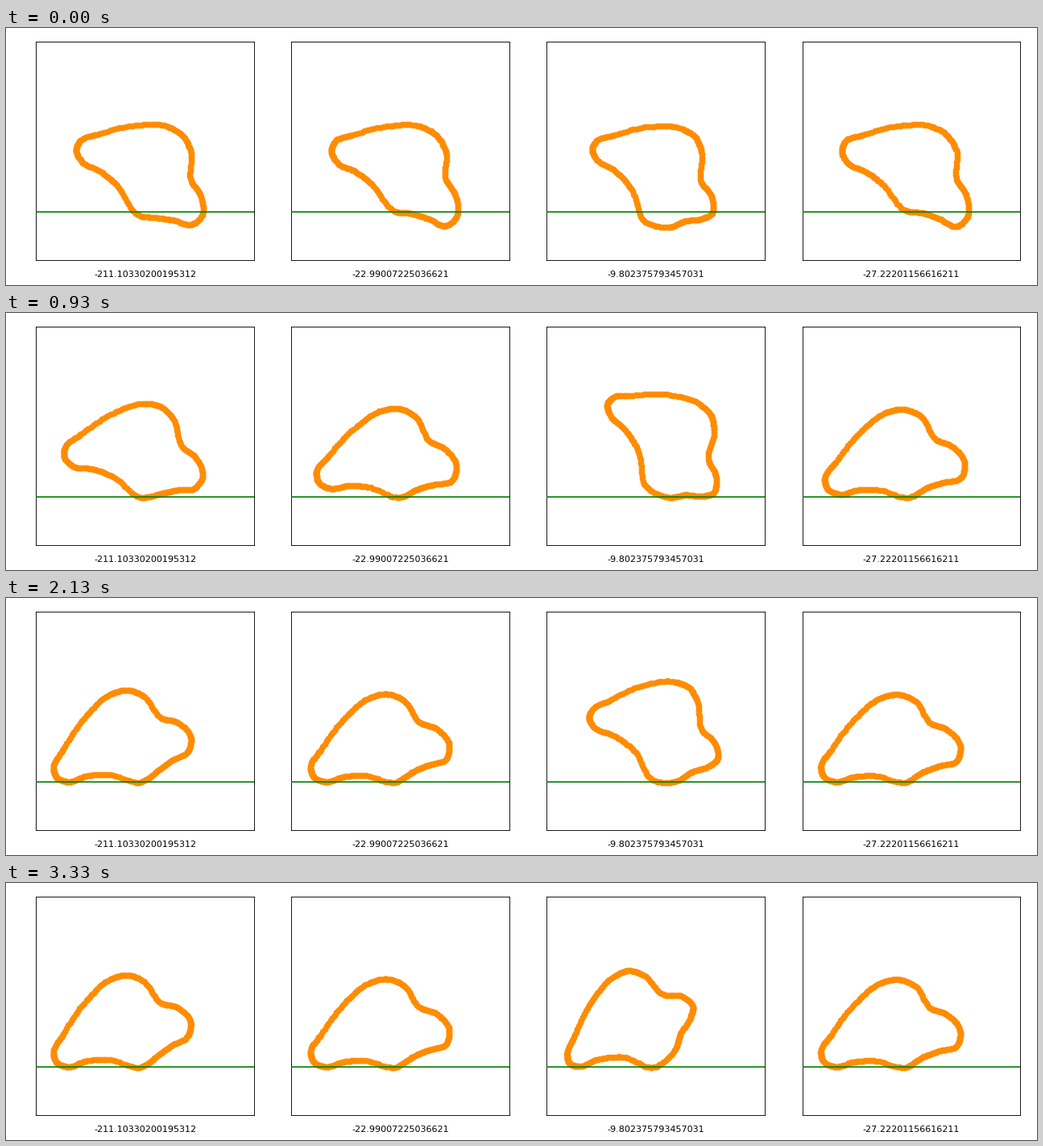
Recreate the animation shown at these times as a matplotlib script. Size 1280 by 320 pixels, loop 3360 ms.

```python
import numpy as np
import matplotlib.pyplot as plt
from matplotlib.animation import FuncAnimation

W, H, DPI = 1280, 320, 80
LOOP, STEP = 3360, 30
LEFT, GAP, BOTTOM, WIDTH, HEIGHT = 37.4, 317.04, 31.3, 270.8, 272
GROUND, CONTACT = 229, 229.7   # green line and lowest point at rest, in pixels
STRETCH = 1.09                 # x is drawn this much narrower than y
SETTLE, SLIDE = 0.11, 0.225    # decay times in seconds
START_X = 140.5                # first pivot position inside each panel

# Two key outlines around their pivot, clockwise from the left tip;
# every body is a blend of them.
FLAT = [(-86.5, 34), (-73.5, 12), (-43, -28), (-13.5, -52), (8.5, -57),
        (29, -49.5), (50, -21), (69, -14), (86, 6.5), (82, 25), (60, 32),
        (40, 40), (21, 52), (-21, 44.5), (-46, 46), (-68, 52), (-83, 45.5)]
TALL = [(-77.5, 41), (-68, 15.5), (-46, -28), (-18, -58), (-1.5, -64),
        (16, -58.5), (42, -34), (62, -33), (77, -20), (74, -6), (62, 14),
        (55, 34), (29, 55), (-9, 42.5), (-40, 45.5), (-64, 54), (-75, 49.5)]


def smooth_loop(p, n=12):
    """Closed cubic curve through the points, paced by their distances."""
    q = np.roll(p, -1, axis=0)
    h = np.linalg.norm(q - p, axis=1)[:, None]
    before = np.roll(h, 1, axis=0)
    slope = (q - p) / h
    tangent = (np.roll(slope, 1, axis=0) * h + slope * before) / (h + before)
    m0, m1 = tangent * h, np.roll(tangent, -1, axis=0) * h
    p, q, m0, m1 = (a[:, None, :] for a in (p, q, m0, m1))
    u = np.linspace(0, 1, n, endpoint=False)[None, :, None]
    ease = u * u * (3 - 2 * u)
    curve = (p + (q - p) * ease + m0 * u * (1 - u) ** 2
             - m1 * u * u * (1 - u))
    return curve.reshape(-1, 2)


class Body:
    """Pops out of the ground, balances on two bumps, tips over and slides."""

    def __init__(self, tall, size, rest, slide, roll, balance, land, rate):
        points = (1 - tall) * np.array(FLAT) + tall * np.array(TALL)
        self.shape = smooth_loop(points * size)
        self.rest, self.slide, self.roll = rest, slide, roll
        self.balance, self.land, self.rate = balance, land, rate
        self.start = 37.5 + 12 * tall
        self.push = START_X - rest - slide - roll * self.start
        self.sink = 172.5 + 7 * tall + self.turned(self.start)[1].max() - CONTACT

    def turned(self, angle):
        c, s = np.cos(np.radians(angle)), np.sin(np.radians(angle))
        x, y = self.shape.T
        return x * c - y * s / STRETCH, x * s * STRETCH + y * c

    def outline(self, t):
        fade = np.exp(-t / SETTLE)
        if t < self.land:
            tip = 1 - np.exp(self.rate * (t - self.land))
            angle = self.balance * tip + (self.start - self.balance) * fade
            cx = self.rest + self.slide + self.roll * angle + self.push * fade
        else:
            angle = 0
            cx = self.rest + self.slide * np.exp((self.land - t) / SLIDE)
        x, y = self.turned(angle)
        return cx + x, y - y.max() + CONTACT + self.sink * fade


bodies = {
    "-211.10330200195312": Body(0.3, 1.02, 106.9, 12, 0.38, 34, 1.147, 5),
    "-22.99007225036621": Body(0.03, 1, 109.9, 7.6, 0.406, 25, 0.973, 6.95),
    "-9.802375793457031": Body(1, 1.01, 102.8, 14, 0.59, 62.5, 2.6, 2.08),
    "-27.22201156616211": Body(-0.03, 1, 109.7, 5, 0.49, 20.5, 0.942, 8.4),
}

fig = plt.figure(figsize=(W / DPI, H / DPI), dpi=DPI, facecolor="white")
dots = []
for i, label in enumerate(bodies):
    x = LEFT + GAP * i
    ax = fig.add_axes([x / W, BOTTOM / H, WIDTH / W, HEIGHT / H])
    ax.set_xlim(0, WIDTH)
    ax.set_ylim(H - BOTTOM, H - BOTTOM - HEIGHT)
    ax.set_xticks([])
    ax.set_yticks([])
    dots += ax.plot([], [], "o", color="darkorange")
    ax.axhline(GROUND, color="green", lw=1.5, zorder=3)
    fig.text((x + WIDTH / 2) / W, 1 - 310 / H, label, fontsize=10,
             ha="center", va="baseline")


def draw(i):
    for dot, body in zip(dots, bodies.values()):
        dot.set_data(*body.outline(i * STEP / 1000))
    return dots


anim = FuncAnimation(fig, draw, frames=LOOP // STEP, interval=STEP,
                     repeat=True, repeat_delay=0)
plt.show()
```
